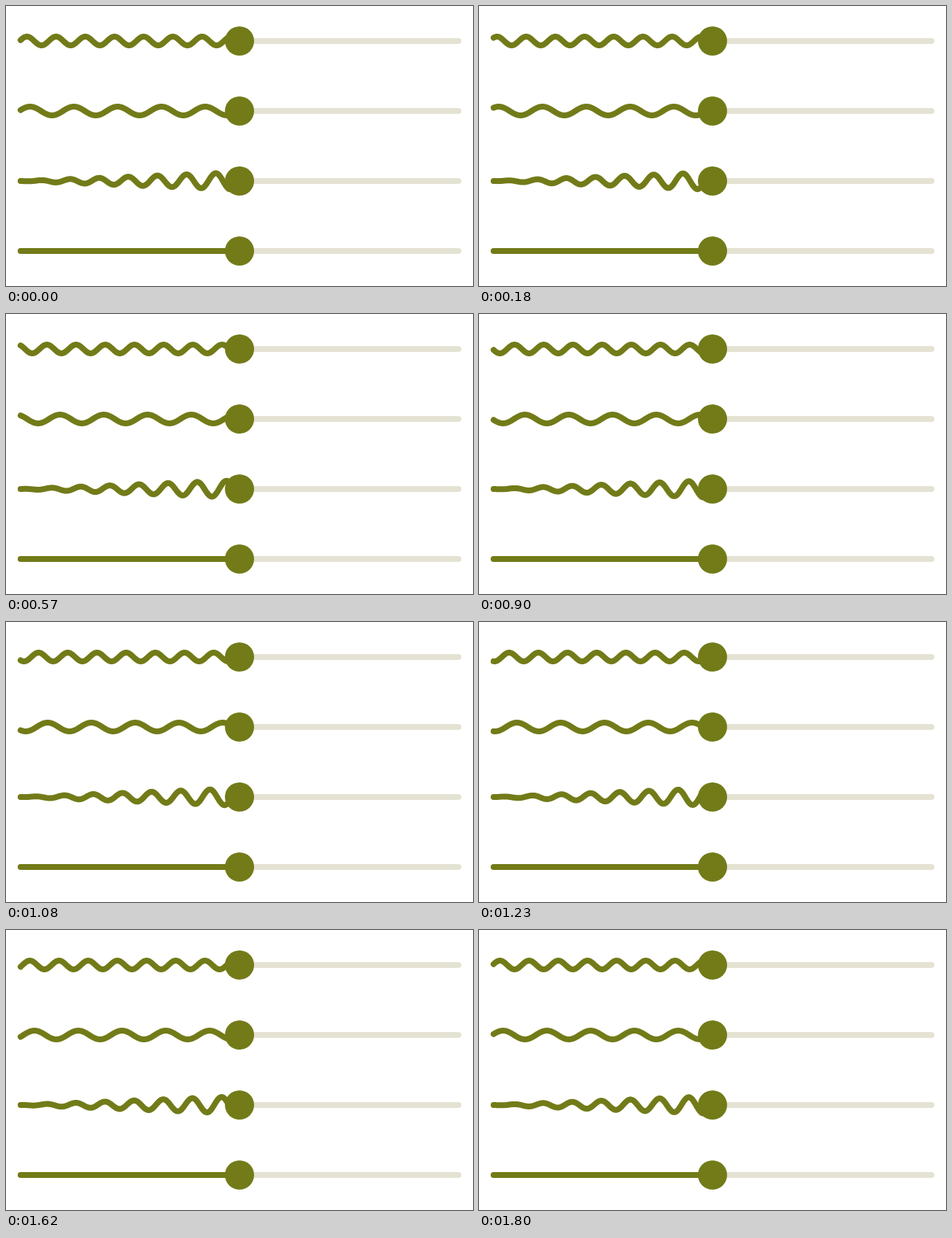
Write an HTML page that moves like this. It is 640 px wide and 384 px high and loops after 1830 ms.

```html
<!DOCTYPE html>
<html lang="en">
<head>
<meta charset="utf-8">
<title>Wavy sliders</title>
<style>
  html, body { margin: 0; width: 100%; height: 100%; overflow: hidden; background: #fff; }
  svg { display: block; width: 640px; height: 384px; }
  path { fill: none; stroke-width: 8; stroke-linecap: round; stroke-linejoin: round; }
  .rest { stroke: #e4e2d2; }
  .done { stroke: #727b18; }
  circle { fill: #727b18; }
</style>
</head>
<body>
<svg id="stage" viewBox="0 0 640 384"></svg>
<script>
  const START = 20, THUMB = 320, END = 620;
  const STEP = 30, LOOP = 1830, CYCLE = 60, LEAD = 2;

  // turns: wavelengths travelled to the left per cycle
  const sliders = [
    { y: 48, wave: 40, turns: 1, height: () => -6 },
    { y: 144, wave: 60, turns: 1, height: () => -6 },
    { y: 240, wave: 40, turns: 2, height: part => 12 * part },
    { y: 336 }
  ];

  const stage = document.getElementById('stage');

  function add(tag, attrs) {
    const el = document.createElementNS('http://www.w3.org/2000/svg', tag);
    for (const name in attrs) el.setAttribute(name, attrs[name]);
    return stage.appendChild(el);
  }

  function wavePath({ y, wave, turns, height }, phase) {
    const points = [];
    for (let x = START; x <= THUMB; x++) {
      const angle = 2 * Math.PI * ((x - START) / wave + turns * phase);
      const part = (x - START) / (THUMB - START);
      points.push(x + ' ' + (y + height(part) * Math.sin(angle)).toFixed(2));
    }
    return 'M' + points.join('L');
  }

  for (const s of sliders) {
    add('path', { class: 'rest', d: `M${THUMB} ${s.y}H${END}` });
    s.line = add('path', { class: 'done', d: `M${START} ${s.y}H${THUMB}` });
    add('circle', { cx: THUMB, cy: s.y, r: 20 });
  }

  const origin = performance.now();
  let shown = -1;

  function draw() {
    const step = Math.floor((performance.now() - origin) % LOOP / STEP);
    if (step !== shown) {
      shown = step;
      const phase = (step + LEAD) / CYCLE;
      for (const s of sliders) {
        if (s.wave) s.line.setAttribute('d', wavePath(s, phase));
      }
    }
    requestAnimationFrame(draw);
  }
  draw();
</script>
</body>
</html>
```
